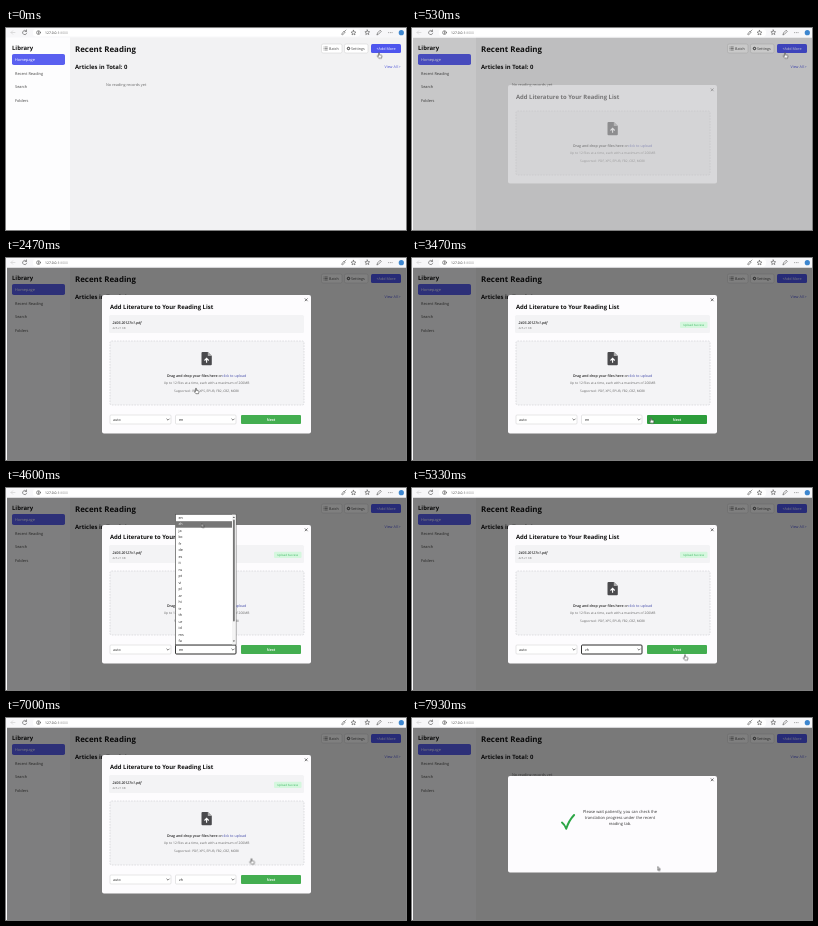
Animation of 400 by 202 pixels, one loop 8000 ms. Source, as an HTML page:

```html
<!DOCTYPE html>
<html lang="en">
<head>
<meta charset="utf-8">
<title>Recent Reading</title>
<style>
html, body { margin: 0; width: 100%; height: 100%; overflow: hidden; background: #f2f2f3; }
svg { display: block; width: 100vw; height: 100vh; }
text { font: 3.7px "Open Sans", "Noto Sans", sans-serif; fill: #444; text-rendering: geometricPrecision; }
text.h1 { font-size: 7.9px; font-weight: 700; fill: #111; }
text.h2 { font-size: 5.92px; font-weight: 700; fill: #111; }
text.nav { font-size: 3.9px; }
text.mid { text-anchor: middle; }
text.light { fill: #fff; }
.icon { fill: none; stroke: #555; stroke-width: .6; stroke-linecap: round; stroke-linejoin: round; }
.field { fill: #fff; stroke: #ccc; stroke-width: .5; }

.step, .glide { animation: 8s infinite; }
.step { animation-timing-function: step-end; }
.glide { animation-timing-function: ease-in-out; }
#shade, #modal { animation-name: open; }
#drop { animation-name: drop; }
#form { animation-name: form; }
#done { animation-name: done; }
#badge { animation-name: badge; }
#next { animation-name: next; }
#menu { animation-name: menu; }
#focus { animation-name: focus; }
#en { animation-name: before; }
#zh { animation-name: after; }
#cursor { animation-name: travel; }
#hand { animation-name: hand; }
#arrow { animation-name: arrow; }

@keyframes open { 0%, 5.5% { opacity: 0 } 8%, 100% { opacity: 1 } }
@keyframes drop { 0% { opacity: 1 } 27.5%, 100% { opacity: 0 } }
@keyframes form { 0% { opacity: 0 } 27.5% { opacity: 1 } 90%, 100% { opacity: 0 } }
@keyframes done { 0% { opacity: 0 } 90%, 100% { opacity: 1 } }
@keyframes badge { 0% { opacity: 0 } 33.8%, 100% { opacity: 1 } }
@keyframes next {
  0% { fill: #43ad50 } 39% { fill: #2c9c3b } 45% { fill: #43ad50 }
  67.5% { fill: #2c9c3b } 75%, 100% { fill: #43ad50 }
}
@keyframes menu { 0% { opacity: 0 } 53.4% { opacity: 1 } 60.5%, 100% { opacity: 0 } }
@keyframes focus { 0% { opacity: 0 } 53.4% { opacity: 1 } 70%, 100% { opacity: 0 } }
@keyframes before { 0% { opacity: 1 } 60.5%, 100% { opacity: 0 } }
@keyframes after { 0% { opacity: 0 } 60.5%, 100% { opacity: 1 } }
@keyframes travel {
  0%, 7% { transform: translate(373px, 24.5px) }
  19%, 24.5% { transform: translate(150px, 179px) }
  27.5%, 31.5% { transform: translate(190px, 130px) }
  39.5%, 44% { transform: translate(239px, 159.5px) }
  49.5%, 53.5% { transform: translate(200px, 162px) }
  56.8%, 60.5% { transform: translate(195.5px, 35.5px) }
  66%, 67% { transform: translate(273px, 166.5px) }
  69%, 73% { transform: translate(268px, 162px) }
  84%, 91% { transform: translate(245.5px, 140.5px) }
  97%, 100% { transform: translate(245.5px, 148.5px) }
}
@keyframes hand {
  0% { opacity: 1 } 8% { opacity: 0 } 27.5% { opacity: 1 } 45% { opacity: 0 }
  65.5% { opacity: 1 } 90%, 100% { opacity: 0 }
}
@keyframes arrow {
  0% { opacity: 0 } 8% { opacity: 1 } 27.5% { opacity: 0 } 45% { opacity: 1 }
  65.5% { opacity: 0 } 90%, 100% { opacity: 1 }
}
</style>
</head>
<body>
<svg viewBox="0 0 400 202" preserveAspectRatio="none">
  <defs>
    <g id="zone">
      <rect x="104" y="83" width="194" height="64" rx="1.5" fill="#f4f4f6" stroke="#c9c9ce" stroke-width=".6" stroke-dasharray="1.6 1.2"/>
      <path d="M196.500 94h5.300l4 4v8.200q0 1-1 1h-8.300q-1 0-1-1v-11.200q0-1 1-1z" fill="#4a4a4d"/>
      <path d="M201.800 94v4h4z" fill="#aaa"/>
      <path d="M200.600 104.800v-4.300m-2.100 2 2.100-2.100 2.100 2.100" fill="none" stroke="#fff" stroke-width="1.100"/>
      <text class="mid" x="200.500" y="118.500" style="font-size:3.6px;fill:#222"><tspan font-weight="600">Drag and drop your files here</tspan> or<tspan fill="#4149a8">click to upload</tspan></text>
      <text class="mid" x="200.500" y="126.300" style="font-size:3.3px;fill:#666">Up to 12 files at a time, each with a maximum of 200MB</text>
      <text class="mid" x="200.500" y="133.500" style="font-size:3.2px;fill:#666">Supported : PDF, XPS, EPUB, FB2, CBZ, MOBI</text>
    </g>
    <path id="close" class="icon" d="m299.100 60.700 2.200 2.200m0-2.200-2.200 2.200" style="stroke:#222"/>
    <path id="chevron" class="icon" d="m-1.200-.6 1.200 1.200 1.200-1.200" style="stroke:#222"/>
  </defs>

  <!-- page -->
  <rect width="400" height="202" fill="#f2f2f3"/>
  <rect y="9" width="64" height="193" fill="#fdfdfe"/>
  <text class="h2" x="6" y="21.500">Library</text>
  <rect x="6" y="26" width="53" height="11" rx="1.800" fill="#5a60f0"/>
  <text class="nav light" x="9" y="33">Homepage</text>
  <text class="nav" x="9" y="46.600">Recent Reading</text>
  <text class="nav" x="9" y="60">Search</text>
  <text class="nav" x="9" y="73.500">Folders</text>
  <text class="h1" x="69" y="23.700">Recent Reading</text>
  <text class="h2" x="69" y="40.600">Articles in Total: 0</text>
  <text x="100" y="57.500" style="font-size:3.8px;fill:#666">No reading records yet</text>
  <g class="field">
    <rect x="315.500" y="16" width="20.500" height="9" rx="1.500"/>
    <rect x="338.500" y="16" width="23.500" height="9" rx="1.500"/>
  </g>
  <path class="icon" d="M318 19h.1m1.200 0h2m-3.300 1.500h.1m1.200 0h2m-3.300 1.500h.1m1.200 0h2"/>
  <circle cx="342.500" cy="20.500" r="1.200" fill="none" stroke="#333" stroke-width="1"/>
  <text x="323" y="21.900">Batch</text>
  <text x="345" y="21.900">Settings</text>
  <rect x="365" y="16" width="30" height="9" rx="1.500" fill="#4e56ee"/>
  <text class="mid light" x="380" y="21.900">+Add More</text>
  <text x="378.500" y="39.500" style="fill:#4e56d8">View All &gt;</text>

  <rect id="shade" class="glide" x="1" y="9.500" width="399" height="192.500" fill="#000" fill-opacity=".5"/>

  <!-- browser bar -->
  <rect width="400" height="9.500" fill="#f7f7f9"/>
  <rect x="27" y="1" width="327" height="7.500" rx="3" fill="#fff"/>
  <g class="icon">
    <path d="M9 4.500H5m1.700-1.700L5 4.500l1.700 1.700" stroke="#ccc" style="stroke:#ccc"/>
    <path d="M20.300 3.200a2.100 2.100 0 1 0 .4 2M20.500 1.900v1.500H19"/>
    <circle cx="32.500" cy="4.600" r="1.900"/><path d="M32.500 4.400v1.200m0-2.100v.1"/>
    <path d="m335.800 6 2.200-3 1.200 1-2.200 2.600zM339 3l1-1"/>
    <path id="star" d="m347.500 2.300.7 1.600 1.700.2-1.300 1.100.4 1.700-1.500-.9-1.500.9.4-1.700-1.300-1.100 1.700-.2z"/>
    <path d="m361.300 2 .7 1.600 1.700.2-1.300 1.100.4 1.700-1.500-.9-1.500.9.4-1.700-1.300-1.100 1.700-.2z"/>
    <path d="m371 6.600.6-1.800 2.600-2.600 1.100 1.100-2.600 2.700z"/>
    <path d="M382.600 4.600h.1m1.600 0h.1m1.600 0h.1"/>
  </g>
  <circle cx="395.300" cy="4.700" r="2.600" fill="#3c86cf"/>
  <text x="39" y="5.900" style="font-size:3.4px;fill:#333">127.0.0.1<tspan fill="#999">:8000</tspan></text>

  <!-- dialog -->
  <g id="modal" class="glide">
    <g id="drop" class="step">
      <rect x="96" y="57" width="209" height="98.500" rx="2" fill="#fdfcfe"/>
      <text class="h2" x="104" y="71.200">Add Literature to Your Reading List</text>
      <use href="#zone"/>
      <use href="#close"/>
    </g>
    <g id="form" class="step">
      <rect x="96" y="37" width="209" height="138.500" rx="2" fill="#fdfcfe"/>
      <text class="h2" x="104" y="51.200">Add Literature to Your Reading List</text>
      <use href="#close" y="-20"/>
      <rect x="103" y="57" width="195" height="18" rx="1.500" fill="#f3f3f5"/>
      <text x="106.500" y="65.800" style="font-size:3.6px;font-weight:600;font-style:italic;fill:#222">2403.20127v1.pdf</text>
      <text x="106.500" y="71.200" style="font-size:2.8px;fill:#777">425.21 KB</text>
      <g id="badge" class="step">
        <rect x="268" y="63.700" width="27.500" height="6.300" rx="1" fill="#d5f7de"/>
        <text class="mid" x="281.700" y="68" style="font-size:2.9px;fill:#35b45b">Upload Success</text>
      </g>
      <use href="#zone"/>
      <rect class="field" x="104" y="157" width="61" height="9" rx="1"/>
      <text x="107" y="162.900" style="font-size:3.6px;fill:#222">auto</text>
      <use href="#chevron" x="162" y="161.600"/>
      <rect class="field" x="169.500" y="157" width="60.500" height="9" rx="1"/>
      <rect id="focus" class="step" x="169.500" y="157" width="60.500" height="9" rx="1" fill="none" stroke="#222" stroke-width=".9"/>
      <g style="font-size:3.6px">
        <text id="en" class="step" x="173" y="162.900" style="fill:#222">en</text>
        <text id="zh" class="step" x="173" y="162.900" style="fill:#222">zh</text>
      </g>
      <use href="#chevron" x="227" y="161.600"/>
      <rect id="next" class="step" x="235" y="157" width="60" height="9" rx="1"/>
      <text class="mid light" x="265" y="162.900" style="font-weight:600">Next</text>
      <g id="menu" class="step">
        <rect x="169.500" y="26.300" width="60.500" height="130.500" fill="#fff" stroke="#555" stroke-width=".7"/>
        <rect x="170" y="33.200" width="56" height="6.500" fill="#767676"/>
        <g id="options"></g>
        <rect x="226" y="26.700" width="3.700" height="129.700" fill="#f4f4f4"/>
        <rect x="227" y="31.500" width="1.800" height="102" rx=".9" fill="#777"/>
        <path d="m226.800 30 1.100-1.600 1.100 1.600zm0 122.500 1.100 1.600 1.100-1.600z" fill="#555"/>
      </g>
    </g>
    <g id="done" class="step">
      <rect x="96" y="58" width="209" height="96.500" rx="2" fill="#fdfcfe"/>
      <use href="#close"/>
      <path d="M150 104.500q2.600 2 4.200 6.200 2.800-8.400 7.900-13.700" fill="none" stroke="#2ca646" stroke-width="2" stroke-linecap="round" stroke-linejoin="round"/>
      <g>
        <text class="mid" x="208" y="94.500" style="font-size:4.05px;fill:#333">Please wait patiently, you can check the</text>
        <text class="mid" x="208" y="100.700" style="font-size:4.05px;fill:#333">translation progress under the recent</text>
        <text class="mid" x="208" y="106.900" style="font-size:4.05px;fill:#333">reading tab.</text>
      </g>
    </g>
  </g>

  <g id="cursor" class="glide">
    <path id="hand" class="step" d="M-.5.4q.5-.8 1 0v2l2 .5q.6.2.5.9l-.5 1.900h-2.600l-1.900-2.200q.3-.7 1.500.1z" fill="#fff" stroke="#222" stroke-width=".5"/>
    <path id="arrow" class="step" d="M0 0v3.700l.9-.8.7 1.500.7-.3-.7-1.500h1.200z" fill="#fff" stroke="#111" stroke-width=".5"/>
  </g>
</svg>
<script>
const languages = 'en zh ja ko fr de es it ru pt vi pl ar hi tr th ur id ms fa'.split(' ');
const options = document.getElementById('options');
languages.forEach((code, i) => {
  const label = document.createElementNS(options.namespaceURI, 'text');
  label.setAttribute('x', 172.5);
  label.setAttribute('y', 30.8 + i * 6.5);
  label.style.fill = i === 1 ? '#fff' : '#222';
  label.textContent = code;
  options.append(label);
});
</script>
</body>
</html>
```
